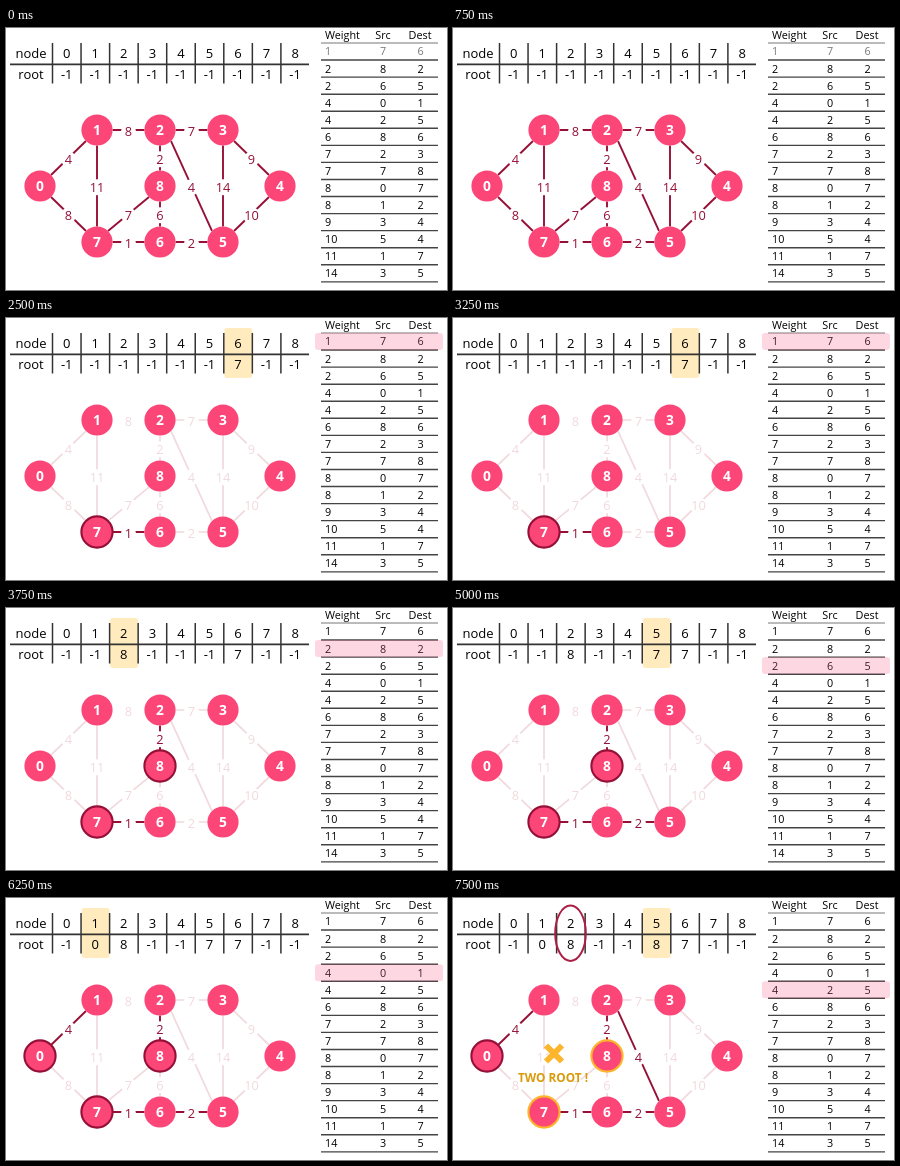
Write an HTML page with a canvas that moves like this. It is 441 px wide and 262 px high and loops after 8 s.

```html
<!DOCTYPE html>
<html lang="en">
<head>
<meta charset="utf-8">
<style>
html, body { margin: 0; width: 100%; height: 100%; overflow: hidden; background: #fff; }
canvas { display: block; width: 441px; height: 262px; }
</style>
</head>
<body>
<canvas id="stage"></canvas>
<script>
const W = 441, H = 262, STEP = 1250, LOOP = 8000;
const FONT = '"Open Sans", "Noto Sans", sans-serif';
const PINK = '#fc4678', WINE = '#960f37', FAINT = '#f1d9dd', GOLD = '#fdb52c', INK = '#000';
const RADIUS = 15.6;

const canvas = document.getElementById('stage');
const ctx = canvas.getContext('2d');
const ratio = window.devicePixelRatio || 1;
canvas.width = W * ratio;
canvas.height = H * ratio;
ctx.scale(ratio, ratio);

const nodes = [[34, 158], [91, 102], [154, 102], [217, 102], [274, 158],
  [217, 214], [154, 214], [91, 214], [154, 158]];

// weight, source, destination
const edges = [[1, 7, 6], [2, 8, 2], [2, 6, 5], [4, 0, 1], [4, 2, 5], [6, 8, 6], [7, 2, 3],
  [7, 7, 8], [8, 0, 7], [8, 1, 2], [9, 3, 4], [10, 5, 4], [11, 1, 7], [14, 3, 5]];

// Each union sets one entry of the root array.
const unions = [[6, 7], [2, 8], [5, 7], [1, 0], [5, 8]];

function text(str, x, y, size, color = INK, { weight = 500, align = 'center' } = {}) {
  ctx.font = `${weight} ${size}px ${FONT}`;
  ctx.textAlign = align;
  ctx.fillStyle = color;
  ctx.fillText(str, x, y + size * 0.357);
}

function line(x1, y1, x2, y2, color, width) {
  ctx.strokeStyle = color;
  ctx.lineWidth = width;
  ctx.beginPath();
  ctx.moveTo(x1, y1);
  ctx.lineTo(x2, y2);
  ctx.stroke();
}

function roundBox(x, y, w, h, r, color) {
  ctx.fillStyle = color;
  ctx.beginPath();
  ctx.roundRect(x, y, w, h, r);
  ctx.fill();
}

function ellipse(x, y, rx, ry) {
  ctx.beginPath();
  ctx.ellipse(x, y, rx, ry, 0, 0, Math.PI * 2);
}

function drawRootTable(done, conflict) {
  const roots = Array(9).fill(-1);
  unions.slice(0, done).forEach(([node, root]) => { roots[node] = root; });
  const columnX = i => 46.5 + i * 28.55;

  if (done) roundBox(columnX(unions[done - 1][0]) + 0.5, 10, 28, 50, 3, '#ffebbd');
  line(4, 36.4, 303, 36.4, '#333', 1.6);
  text('node', 25, 25, 13);
  text('root', 25, 46.5, 13);
  roots.forEach((root, i) => {
    const x = columnX(i);
    line(x, 15, x, 55.5, '#333', 1.5);
    text(i, x + 14.2, 25, 13);
    text(root, x + 14.2, 46.5, 13);
  });
  if (conflict) {
    ellipse(117.5, 35.2, 15.3, 27.7);
    ctx.strokeStyle = '#ac1f45';
    ctx.lineWidth = 2;
    ctx.stroke();
  }
}

function drawEdgeTable(done) {
  const pitch = 17.06, top = 15;
  text('Weight', 319, 7, 10.8, INK, { align: 'left' });
  text('Src', 377, 7, 10.8);
  text('Dest', 414, 7, 10.8);
  line(315, top, 432, top, '#777', 1);
  edges.forEach(([weight, src, dest], i) => {
    const y = top + i * pitch, mid = y + 8.6;
    const color = i === 0 && done === 0 ? '#777' : INK;
    text(weight, 319, mid, 10.8, color, { align: 'left' });
    text(src, 377, mid, 10.8, color);
    text(dest, 414.5, mid, 10.8, color);
    line(315, y + pitch, 432, y + pitch, '#444', 1.4);
  });
  if (done) {
    roundBox(309, top + (done - 1) * pitch, 128, 17, 3, 'rgba(245, 100, 140, 0.26)');
  }
}

// Edges join the nodes at the nearest of eight compass points.
function port([x, y], dx, dy) {
  const sx = Math.sign(dx), sy = Math.sign(dy), r = RADIUS / Math.hypot(sx, sy);
  return [x + sx * r, y + sy * r];
}

function drawEdge([weight, a, b], color, width, bare) {
  const [x1, y1] = nodes[a], [x2, y2] = nodes[b];
  const dx = x2 - x1, dy = y2 - y1;
  const x = x1 + dx / 2, y = y1 + dy / 2 + 1.3;
  if (!bare) line(...port(nodes[a], dx, dy), ...port(nodes[b], -dx, -dy), color, width);
  ellipse(x, y, weight > 9 ? 9 : 7.5, 8);
  ctx.fillStyle = '#fff';
  ctx.fill();
  text(weight, x, y, 12.8, color);
}

function drawNode([x, y], i, ring) {
  ellipse(x, y, RADIUS, RADIUS);
  ctx.fillStyle = PINK;
  ctx.fill();
  if (ring) {
    ctx.strokeStyle = ring;
    ctx.lineWidth = 2.1;
    ctx.stroke();
  }
  text(i, x, y, 13.8, '#fff', { weight: 700 });
}

function ringColor(i, done, conflict) {
  if (conflict && (i === 7 || i === 8)) return GOLD;
  const rootSince = { 7: 1, 8: 2, 0: 4 };
  return done >= rootSince[i] ? WINE : null;
}

function drawCross(x, y, arm) {
  line(x - arm, y - arm, x + arm, y + arm, GOLD, 6);
  line(x + arm, y - arm, x - arm, y + arm, GOLD, 6);
}

function drawGraph(phase, done, conflict) {
  const isActive = i => phase === 0 || i < done;
  const order = edges.map((_, i) => i).sort((a, b) => isActive(a) - isActive(b));
  order.forEach(i => {
    const bare = i === 9 && done > 0;
    drawEdge(edges[i], isActive(i) ? WINE : FAINT, isActive(i) ? 1.9 : 1.7, bare);
  });
  nodes.forEach((node, i) => drawNode(node, i, ringColor(i, done, conflict)));
  if (conflict) {
    drawCross(101, 155.5, 8);
    text('TWO ROOT !', 100, 179.5, 11.8, '#d99b0b', { weight: 700 });
  }
}

function draw(time) {
  const phase = Math.floor((time % LOOP) / STEP);
  const done = Math.max(0, phase - 1);
  const conflict = done === unions.length;
  ctx.fillStyle = '#fff';
  ctx.fillRect(0, 0, W, H);
  drawRootTable(done, conflict);
  drawEdgeTable(done);
  drawGraph(phase, done, conflict);
}

let start;
function tick(now) {
  start ??= now;
  draw(now - start);
  requestAnimationFrame(tick);
}
draw(0);
requestAnimationFrame(tick);
</script>
</body>
</html>
```
